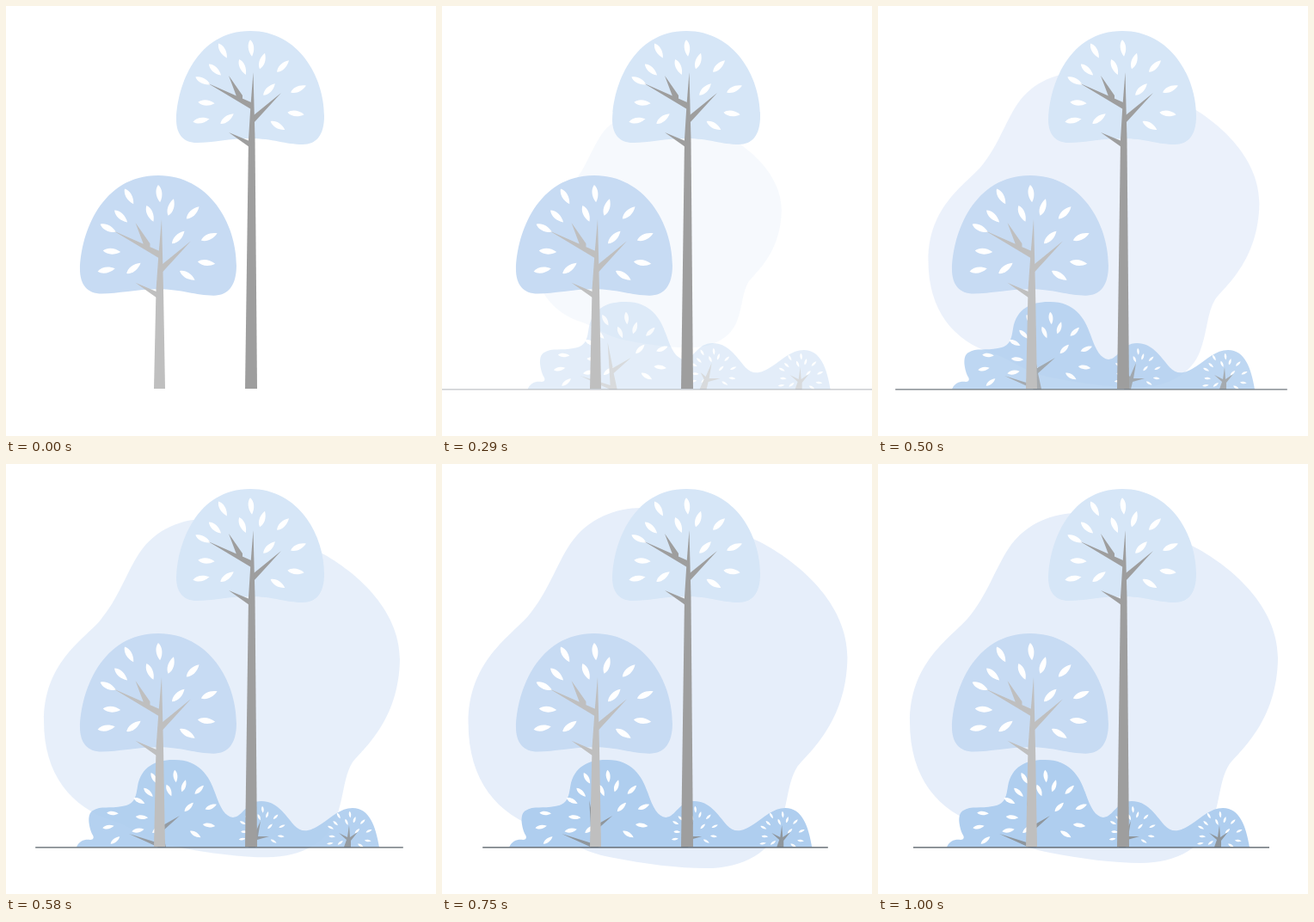
Animation of 500 by 500 pixels, one loop 1.04 s. Source, as an HTML page:

```html
<!DOCTYPE html>
<html lang="en">
<head>
<meta charset="utf-8">
<title>Trees</title>
<style>
  @property --grow { syntax: "<number>"; inherits: true; initial-value: .5; }

  html, body { margin: 0; width: 100%; height: 100%; overflow: hidden; background: #fff; }
  svg { display: block; width: 100%; height: 100%; }

  /* One value drives the whole scene: it overshoots, then settles at 1. */
  #scene { animation: grow 1040ms infinite, wait 1040ms step-end infinite; }
  #scene > * { opacity: calc(var(--grow) * 2 - 1); }
  #blob { transform-origin: 250.5px 260.5px; transform: scale(var(--grow)); }
  #bushes { transform: translateX(calc((1 - var(--grow)) * 60px)); }
  #ground { transform-origin: 248px 446px; transform: scaleX(calc(2 - var(--grow))); }

  @keyframes grow {
    0% { --grow: .5; animation-timing-function: cubic-bezier(.37, 0, .63, 1); }
    72.12% { --grow: 1.03; animation-timing-function: cubic-bezier(.37, 0, .63, 1); }
    96.15%, 100% { --grow: 1; }
  }
  @keyframes wait {
    0% { visibility: hidden; }
    12.48%, 100% { visibility: visible; }
  }
</style>
</head>
<body>
<svg viewBox="0 0 500 500">
  <defs>
    <path id="leaf" d="M-9.7 0C-5-4.3 3-4.3 9.7 0C3 4.3-5 4.3-9.7 0Z"/>
    <g id="leaves" fill="#fff">
      <use href="#leaf" transform="translate(252 52) rotate(60)"/>
      <use href="#leaf" transform="translate(285 49) rotate(84)"/>
      <use href="#leaf" transform="translate(298 64) rotate(-72)"/>
      <use href="#leaf" transform="translate(275 71) rotate(67)"/>
      <use href="#leaf" transform="translate(243 74) rotate(43)"/>
      <use href="#leaf" transform="translate(229 87) rotate(27)"/>
      <use href="#leaf" transform="translate(322 70) rotate(-44)"/>
      <use href="#leaf" transform="translate(306 97) rotate(-45)"/>
      <use href="#leaf" transform="translate(340 96.500) rotate(-24)"/>
      <use href="#leaf" transform="translate(337 125) rotate(7)"/>
      <use href="#leaf" transform="translate(316 139) rotate(31)"/>
      <use href="#leaf" transform="translate(257 131) rotate(-37)"/>
      <use href="#leaf" transform="translate(227 133) rotate(-10)"/>
      <use href="#leaf" transform="translate(233 112.500) rotate(4)"/>
    </g>
    <path id="crown" d="M284 29C340 29 370 82 370 128C370 150 361 161 345 161C325 161 310 154 284 154C260 154 240 159 222 159C206 159 198 149 198 132C199 92 222 29 284 29Z"/>
    <path id="branches" d="M235 90L285 112V120ZM259 81L275 104V108L268 105ZM320 101L288 127V136ZM259 147L283 157V164Z"/>
  </defs>

  <g id="scene">
    <path id="blob" fill="#e6eefa" d="M232 57C205 57 172 68 152 98C136 122 127 153 104 180C82 204 37 232 37 300C37 365 70 404 120 420C150 430 160 445 200 452C235 459 275 464 305 464C350 464 378 444 388 418C398 392 397 368 408 350C420 334 464 300 465 226C465 165 410 118 365 95C315 72 280 57 232 57Z"/>
    <g id="bushes">
      <path fill="#afceef" d="M80 445.500C83 438 90 436 96 437C100 437 101 434 98 430C94 420 92 407 99 403C108 397 120 401 133 398C148 396 149 387 151 375C155 352 172 344 192 344C222 343 234 362 241 382C247 400 253 410 262 411C274 410 277 392 295 392C313 392 322 407 333 420C342 430 352 427 364 419C376 411 387 400 401 400C421 400 428 422 432 445.500Z"/>
      <use href="#leaves" transform="translate(-18.750 326.250) scale(.75)"/>
      <use href="#leaves" transform="translate(179.600 381.600) scale(.41)"/>
      <use href="#leaves" transform="translate(284 388) scale(.4)"/>
      <g fill="#fff">
        <use href="#leaf" transform="translate(122 406) rotate(4) scale(.7)"/>
        <use href="#leaf" transform="translate(117 422) rotate(-10) scale(.7)"/>
        <use href="#leaf" transform="translate(125 437.500) rotate(-38) scale(.7)"/>
      </g>
      <g fill="#8f969c">
        <path d="M173 391L179 421L200 409L180 427L184 445.500H175L141 430L176 441Z"/>
        <path d="M280 445.500L285 434L281 426L287 431L294 415L291 433L304 433L290 437L288 445.500Z"/>
        <path d="M391 445.500L394 437L385 429L395 434L397 420L398 434L407 428L399 438V445.500Z"/>
      </g>
    </g>
    <path id="ground" fill="#4d565e" d="M41 445.200H455V446.500H41Z"/>
  </g>

  <g fill="#bfbfbf">
    <g transform="translate(-123.500 166.300) scale(1.058)">
      <use href="#crown" fill="#c7dbf3"/>
      <use href="#leaves"/>
      <use href="#branches"/>
    </g>
    <path d="M181 248L183 330L185 445H172L174.500 330L177.500 288Z"/>
  </g>
  <g fill="#9e9e9e">
    <use href="#crown" fill="#d6e6f7"/>
    <use href="#leaves"/>
    <use href="#branches"/>
    <path d="M287.500 77L289.500 155L292 445H278L282 155L284.500 115Z"/>
  </g>
</svg>
</body>
</html>
```
